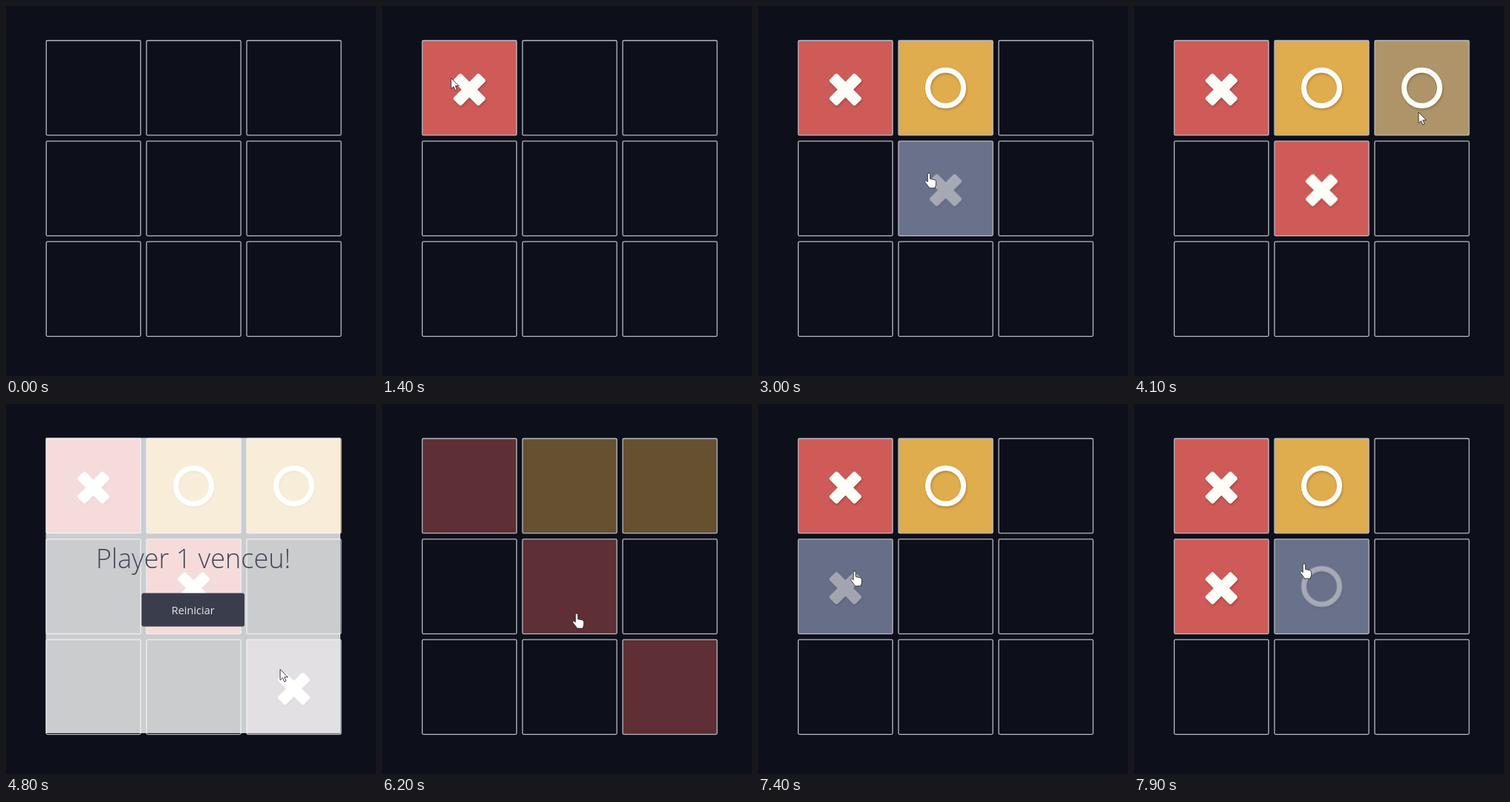
An HTML page without scripts for the animation above (8 s loop, 498 by 498 pixels).

```html
<!DOCTYPE html>
<html lang="pt">
<head>
<meta charset="utf-8">
<title>Jogo da velha</title>
<style>
:root {
  --off: #0d0f1a; --hover: #6a728b; --red: #cf5b58; --yellow: #dfac4e;
  --none: rgba(255, 253, 248, 0); --ghost: rgba(255, 253, 248, .44); --solid: #fffdf8;
}
html, body { margin: 0; width: 100%; height: 100%; overflow: hidden; background: var(--off); }
svg { display: block; width: 100vw; height: 100vh; }

.cell { fill: var(--off); color: var(--none); }
#box { stroke: #b9bcc4; stroke-width: 1.3; }
.mark { filter: drop-shadow(1.5px 2px 1.5px rgba(0, 0, 0, .2)); }
.x { fill: currentColor; }
.o { fill: none; stroke: currentColor; stroke-width: 7; }

.cell, .first, .second, .overlay, .button, .cursor, .arrow, .hand { animation: 8s infinite; }
.c1 { animation-name: c1; }
.c2 { animation-name: c2; }
.c3 { animation-name: c3; }
.c4 { animation-name: c4; }
.c5 { animation-name: c5; }
.c6 { animation-name: c6; }
.c9 { animation-name: c9; }

/* Each cell: idle, hover, click, reset. */
@keyframes c1 {
  11.2%, 80%, 80.2% { fill: var(--off); color: var(--none); }
  13.6%, 82.45% { fill: var(--hover); color: var(--ghost); }
  13.65%, 82.5% { fill: var(--hover); color: var(--solid); }
  17.4%, 76.2%, 86.25%, 100% { fill: var(--red); color: var(--solid); }
  76.25% { fill: var(--red); color: var(--none); }
}
@keyframes c2 {
  23%, 80%, 87.4% { fill: var(--off); color: var(--none); }
  26.75%, 89.05% { fill: var(--hover); color: var(--ghost); }
  27%, 89.1% { fill: var(--hover); color: var(--solid); }
  30.75%, 76.2%, 92.8%, 100% { fill: var(--yellow); color: var(--solid); }
  76.25% { fill: var(--yellow); color: var(--none); }
}
@keyframes c3 {
  45.4%, 80%, 100% { fill: var(--off); color: var(--none); }
  49.15%, 49.95% { fill: var(--hover); color: var(--ghost); }
  50% { fill: var(--hover); color: var(--solid); }
  53.75%, 76.2% { fill: var(--yellow); color: var(--solid); }
  76.25% { fill: var(--yellow); color: var(--none); }
}
@keyframes c4 {
  91% { fill: var(--off); color: var(--none); }
  93% { fill: var(--hover); color: var(--ghost); }
  93.1% { fill: var(--hover); color: var(--solid); }
  96.8%, 100% { fill: var(--red); color: var(--solid); }
}
@keyframes c5 {
  33.7%, 80%, 94.7% { fill: var(--off); color: var(--none); }
  37.4%, 38.45%, 98.4%, 100% { fill: var(--hover); color: var(--ghost); }
  38.5% { fill: var(--hover); color: var(--solid); }
  42.25%, 76.2% { fill: var(--red); color: var(--solid); }
  76.25% { fill: var(--red); color: var(--none); }
}
@keyframes c6 {
  55%, 59.5%, 100% { fill: var(--off); }
  56.4% { fill: #343847; }
}
@keyframes c9 {
  56.4%, 80%, 100% { fill: var(--off); color: var(--none); }
  59%, 59.4% { fill: var(--hover); color: var(--ghost); }
  59.45% { fill: var(--hover); color: var(--solid); }
  63.2%, 76.2% { fill: var(--red); color: var(--solid); }
  76.25% { fill: var(--red); color: var(--none); }
}

/* The centre changes its mark after the restart. */
.first { animation-name: first; animation-timing-function: step-end; }
.second { animation-name: second; animation-timing-function: step-end; }
@keyframes first { 0% { opacity: 1; } 80%, 100% { opacity: 0; } }
@keyframes second { 0% { opacity: 0; } 80%, 100% { opacity: 1; } }

.overlay { animation-name: overlay; animation-timing-function: step-end; }
@keyframes overlay { 0%, 76.25%, 100% { opacity: 0; } 59.4% { opacity: 1; } }
.overlay text { text-anchor: middle; font-family: "Open Sans", sans-serif; }
.title { font-size: 36px; font-weight: 300; fill: #444757; }
.label { font-size: 14.5px; fill: #e6e6e8; }
.button { fill: #3a3d4c; animation-name: button; }
@keyframes button { 72.4% { fill: #3a3d4c; } 74.5%, 100% { fill: #474b5c; } }

.cursor { animation-name: move; animation-timing-function: ease-in-out; }
.cursor path { fill: #fff; stroke: #2a2a30; stroke-width: .9; stroke-linejoin: round; }
@keyframes move {
  0%, 11% { transform: translate(125px, 128px); }
  13.5% { transform: translate(95px, 100px); }
  17%, 21% { transform: translate(93px, 97px); }
  24.5%, 32.5% { transform: translate(222px, 112px); }
  36%, 43.5% { transform: translate(230px, 225px); }
  46.5%, 54.5% { transform: translate(383px, 143px); }
  57.5%, 65% { transform: translate(369px, 357px); }
  68.5%, 71% { transform: translate(386px, 363px); }
  73.5%, 77.5% { transform: translate(262px, 282px); }
  81%, 85% { transform: translate(115px, 118px); }
  87.5%, 90% { transform: translate(217px, 142px); }
  91.7%, 93.8% { transform: translate(130px, 225px); }
  95.5% { transform: translate(226px, 222px); }
  98.7%, 100% { transform: translate(229px, 215px); }
}
.arrow { animation-name: arrow; animation-timing-function: step-end; }
.hand { animation-name: hand; animation-timing-function: step-end; }
@keyframes arrow {
  0%, 11%, 23%, 33.7%, 45.4%, 55%, 72.6%, 86.5%, 91%, 94.7%, 100% { opacity: 0; }
  13.65%, 27%, 38.5%, 50%, 59.4%, 82.5%, 89.1%, 93.1% { opacity: 1; }
}
@keyframes hand {
  0%, 13.65%, 27%, 38.5%, 50%, 59.4%, 82.5%, 89.1%, 93.1% { opacity: 0; }
  11.2%, 23%, 33.7%, 45.4%, 55%, 72.6%, 86.5%, 91%, 94.7%, 100% { opacity: 1; }
}
</style>
</head>
<body>
<svg viewBox="0 0 498 498">
  <defs>
    <rect id="box" x="-63.5" y="-63.7" width="127" height="127.4" rx="1.5"/>
    <g id="x" class="mark">
      <path class="x" transform="translate(0 2.3) rotate(45)" d="M-4.5-24.5h9a3 3 0 0 1 3 3v14h14a3 3 0 0 1 3 3v9a3 3 0 0 1-3 3h-14v14a3 3 0 0 1-3 3h-9a3 3 0 0 1-3-3v-14h-14a3 3 0 0 1-3-3v-9a3 3 0 0 1 3-3h14v-14a3 3 0 0 1 3-3z"/>
    </g>
    <g id="o" class="mark"><circle class="o" r="24"/></g>
  </defs>

  <g transform="translate(117.7 110.2)"><g class="cell c1"><use href="#box"/><use href="#x"/></g></g>
  <g transform="translate(252.6 110.2)"><g class="cell c2"><use href="#box"/><use href="#o"/></g></g>
  <g transform="translate(387.5 110.2)"><g class="cell c3"><use href="#box"/><use href="#o"/></g></g>
  <g transform="translate(117.7 245.6)"><g class="cell c4"><use href="#box"/><use href="#x"/></g></g>
  <g transform="translate(252.6 245.6)"><g class="cell c5"><use href="#box"/><use class="first" href="#x"/><use class="second" href="#o"/></g></g>
  <g transform="translate(387.5 245.6)"><g class="cell c6"><use href="#box"/></g></g>
  <g transform="translate(117.7 380.9)"><g class="cell"><use href="#box"/></g></g>
  <g transform="translate(252.6 380.9)"><g class="cell"><use href="#box"/></g></g>
  <g transform="translate(387.5 380.9)"><g class="cell c9"><use href="#box"/><use href="#x"/></g></g>

  <g class="overlay">
    <rect x="53.5" y="45.5" width="396.5" height="397.5" fill="#fff" fill-opacity=".79"/>
    <text class="title" x="252" y="221">Player 1 venceu!</text>
    <rect class="button" x="182.5" y="254.5" width="138.5" height="45" rx="3"/>
    <text class="label" x="251.7" y="282.5">Reiniciar</text>
  </g>

  <g class="cursor">
    <path class="arrow" d="M0 0V14.5L3.4 11.5 5.6 16.8 8 15.8 5.8 10.6H10.3Z"/>
    <path class="hand" d="M-1.7 1.6a1.7 1.7 0 0 1 3.4 0V7.5l6 1.3q2 .6 2 2.8v3.4q-.2 2-1.2 3.6V20H0v-1.2L-5 12.3q-1-1.8.6-2.4 1.2-.2 2.7 1.9z"/>
  </g>
</svg>
</body>
</html>
```
